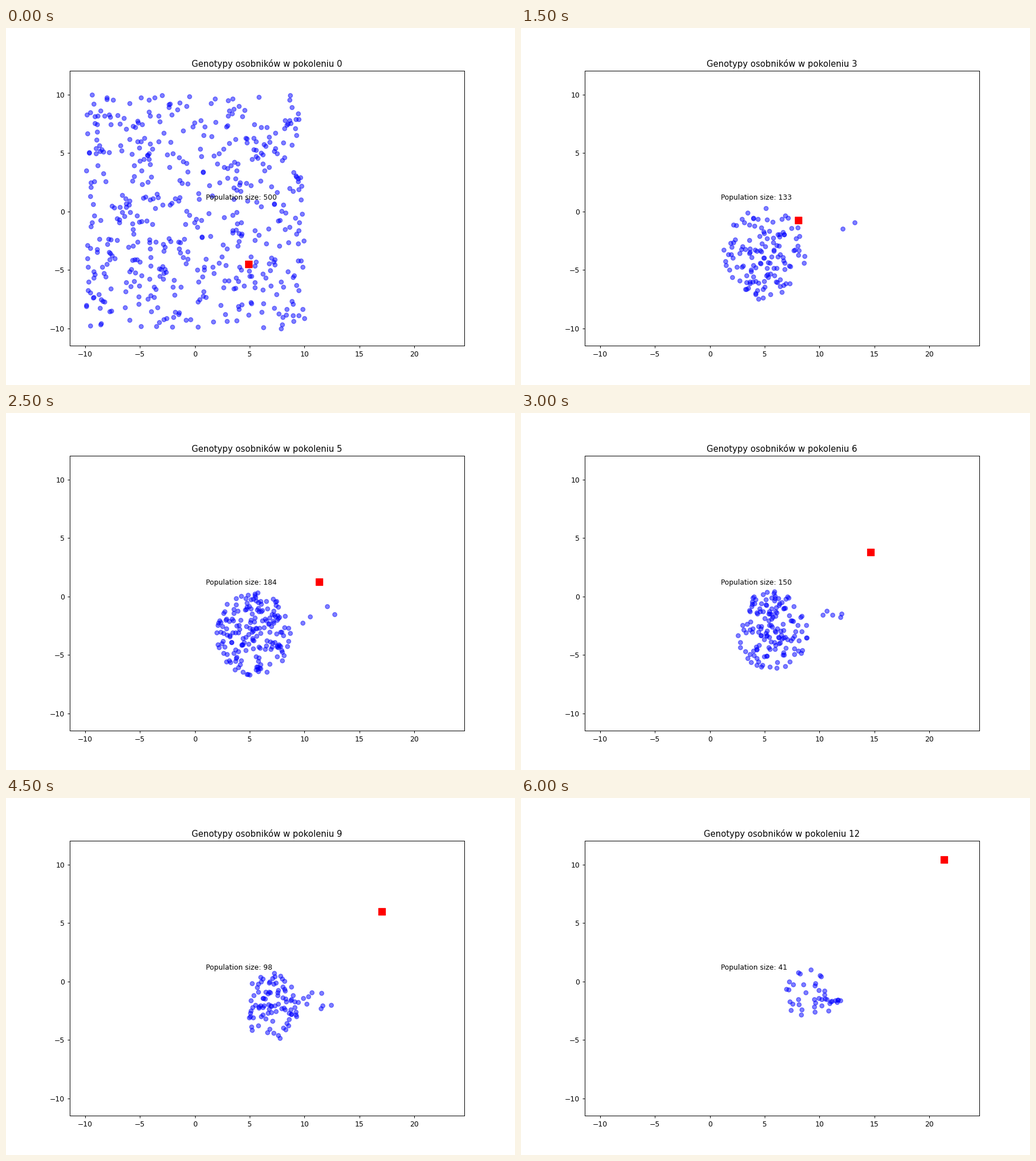
A matplotlib script for the animation above (6500 ms loop, 894 px wide and 626 px high).

```python
import numpy as np
import matplotlib.pyplot as plt
from matplotlib.animation import FuncAnimation

W, H, DPI = 894, 626, 89.4
GENERATIONS, STEP_MS = 13, 500

# Key points by generation; values between them are linear
SIZE_KEYS = {0: 500, 1: 70, 3: 133, 5: 184, 7: 116, 9: 98, 12: 41}
GOAL_KEYS = {0: (4.90, -4.50), 1: (5.03, -4.03), 3: (8.05, -0.75),
             5: (11.34, 1.28), 6: (14.66, 3.80), 7: (16.54, 5.42),
             9: (17.06, 5.98), 10: (19.43, 8.40), 11: (19.45, 8.90),
             12: (21.36, 10.42)}


def between(keys, gen):
    columns = np.array(list(keys.values()), float).reshape(len(keys), -1).T
    return [np.interp(gen, list(keys), column) for column in columns]


def population(gen, size):
    """A uniform start, then a shrinking cloud that drifts after the goal."""
    rng = np.random.default_rng(gen + 20)
    if gen == 0:
        return rng.uniform(-10, 10, (size, 2))
    t = (gen - 1) / (GENERATIONS - 2)
    centre = np.array([4.8 + 4.2 * t ** 2, -3.9 + 2.7 * t ** 1.3])
    reach = np.array([4.1 - 1.9 * t, 4.3 - 2.0 * t])

    leaders = gen - 1
    angle = rng.uniform(0, 2 * np.pi, size - leaders)
    radius = rng.random(size - leaders) ** 0.6
    crowd = centre + reach * np.column_stack([radius * np.cos(angle),
                                              radius * np.sin(angle)])
    ahead = rng.normal((11.3, -1.6), (0.8, 0.4), (leaders, 2))
    return np.vstack([crowd, ahead])


sizes = [round(between(SIZE_KEYS, g)[0]) for g in range(GENERATIONS)]
broods = [population(g, n) for g, n in enumerate(sizes)]

fig, ax = plt.subplots(figsize=(W / DPI, H / DPI), dpi=DPI)
ax.set_xlim(-11.41, 24.55)
ax.set_ylim(-11.47, 12.02)
dots = ax.scatter([], [], color="blue", alpha=0.5)
goal = ax.scatter([], [], color="red", marker="s", s=100)
label = ax.text(1, 1, "")
title = ax.set_title("")


def draw(gen):
    dots.set_offsets(broods[gen])
    goal.set_offsets([between(GOAL_KEYS, gen)])
    label.set_text(f"Population size: {sizes[gen]}")
    title.set_text(f"Genotypy osobników w pokoleniu {gen}")
    return dots, goal, label, title


anim = FuncAnimation(fig, draw, frames=GENERATIONS, interval=STEP_MS, repeat=True)
plt.show()
```
